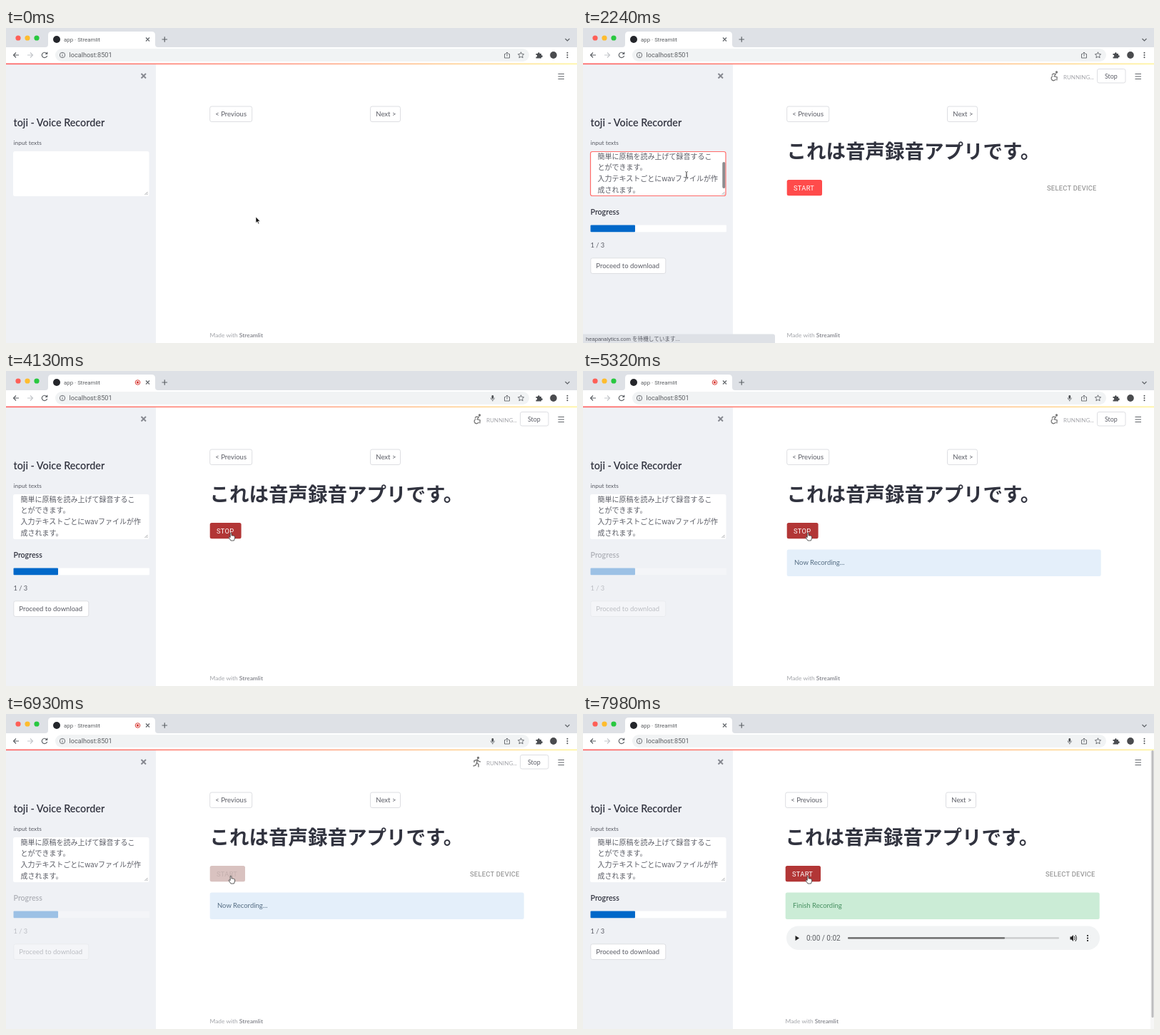
An HTML page that plays this animation: 800x442 px, repeating every 8000 ms.

```html
<!DOCTYPE html>
<html lang="ja">
<head>
<meta charset="utf-8">
<title>Voice Recorder</title>
<style>
html, body { margin: 0; width: 100%; height: 100%; overflow: hidden; background: #fff }
svg { display: block; width: 800px; height: 442px }
text { font: 9.5px Lato, sans-serif; fill: #5a5c65; white-space: pre }
.chrome { font: 7.9px Roboto, sans-serif; fill: #5c5f63 }
.bold { font-weight: 600; fill: #31333f }
.small { font-size: 8.4px }
.mui { font: 9.35px Roboto, sans-serif; letter-spacing: .0285em }
.jp { font: 10px "Noto Sans CJK JP", "Noto Sans CJK", sans-serif }
.title { font: 700 27.5px "Noto Sans CJK JP", "Noto Sans CJK", sans-serif; fill: #31333f }
.button { fill: #fff; stroke: #dddee2 }
.line { fill: none; stroke: #5f6368; stroke-width: 1.2 }
.dark { fill: #4b4e52 }
</style>
</head>
<body>
<svg viewBox="0 0 800 442">
  <defs>
    <linearGradient id="rainbow">
      <stop stop-color="#ff6464"/><stop offset=".5" stop-color="#ffa08a"/><stop offset="1" stop-color="#fff5a0"/>
    </linearGradient>
    <clipPath id="area"><rect x="10" y="174" width="190" height="61"/></clipPath>
  </defs>

  <!-- browser window -->
  <rect width="800" height="27" fill="#dee1e6"/>
  <circle cx="17" cy="14" r="3.600" fill="#fe5f57"/>
  <circle cx="30" cy="14" r="3.600" fill="#febc2e"/>
  <circle cx="43" cy="14" r="3.600" fill="#28c840"/>
  <path d="M55 27q4 0 4-4V10q0-5 5-5H204q5 0 5 5V23q0 4 4 4Z" fill="#fff"/>
  <circle cx="71" cy="16" r="5" fill="#24262b"/>
  <text class="chrome" x="81" y="18.8">app · Streamlit</text>
  <path class="line" d="M196 13.5l5 5m0-5l-5 5M218.500 16h7.500m-3.750-3.750v7.500M783.500 15l3 3 3-3"/>
  <g data-on="3640-7560" fill="none" stroke="#d93c36"><circle cx="184.500" cy="16" r="3.300"/><circle cx="184.500" cy="16" r="1.700" fill="#d93c36" stroke="none"/></g>
  <rect x="69" y="29" width="664" height="18" rx="9" fill="#f1f3f4"/>
  <path class="line" d="M18 38H10.500m3.500-3.500L10.500 38l3.500 3.500M57 35.800a3.700 3.700 0 1 0 .6 3M57.700 33.800v2.600h-2.600"/>
  <path class="line" d="M30 38h7.500m-3.500-3.500l3.500 3.500-3.500 3.500" style="stroke:#c4c7cb"/>
  <circle class="line" cx="79" cy="38" r="3.700" style="stroke-width:.9"/>
  <path class="line" d="M79 37.500v2.500m0-4.300v.9" style="stroke-width:.9"/>
  <text class="chrome" x="88.500" y="41" style="font-size:9.150px">localhost:8501</text>
  <g data-on="3640-8000"><rect class="dark" x="680.500" y="34" width="2.600" height="5" rx="1.300"/><path class="line" d="M679.200 37.500q0 3 2.600 3t2.600-3m-2.600 3v2" style="stroke-width:.8"/></g>
  <path class="line" d="M700 36.500h-1.500v5.500h7v-5.500H704M702 39.500v-5.500m-1.800 1.800l1.800-1.800 1.800 1.800" style="stroke-width:.9"/>
  <path class="line" d="M721.500 33.800l1.200 2.700 3 .3-2.200 2 .6 3-2.600-1.500-2.600 1.500.6-3-2.200-2 3-.3Z" style="stroke-width:.9"/>
  <path class="dark" d="M742.500 36h2.500a1.400 1.400 0 1 1 2.700 0h2.300v2.300a1.400 1.400 0 1 1 0 2.700v1.500h-7.500v-2.100a1.300 1.300 0 1 0 0-2.500Z"/>
  <ellipse cx="767" cy="38" rx="4.800" ry="5" fill="#4a4b4e"/>
  <g class="dark"><circle cx="786.500" cy="34.700" r="1"/><circle cx="786.500" cy="38" r="1"/><circle cx="786.500" cy="41.300" r="1"/></g>

  <!-- sidebar -->
  <rect y="51" width="210" height="391" fill="#eff1f5"/>
  <rect y="49.500" width="800" height="1.700" fill="url(#rainbow)"/>
  <path class="line" d="M189.500 64l6.500 6.500m0-6.500l-6.500 6.500" style="stroke:#85878f;stroke-width:1.900"/>
  <text class="bold" x="10.500" y="138" style="font-size:14.300px">toji - Voice Recorder</text>
  <text class="small" x="10.500" y="163.800">input texts</text>
  <rect x="10" y="173" width="190.500" height="63" rx="2.500" fill="#fff"/>
  <rect data-on="1120-3220" x="10.500" y="173.500" width="189.500" height="62" rx="2.500" fill="none" stroke="#ff6b69" stroke-width="1.200"/>
  <path class="line" d="M194.500 234l4-4m-1.500 4l1.500-1.500" style="stroke-width:.6"/>
  <path data-on="1120-1540" d="M20.800 182v12" stroke="#555" stroke-width=".8"/>
  <g data-on="1540-8000" clip-path="url(#area)">
    <text class="jp" x="20.500" y="183.700">簡単に原稿を読み上げて録音するこ</text>
    <text class="jp" x="20.500" y="199.400">とができます。</text>
    <text class="jp" x="20.500" y="215.100">入力テキストごとにwavファイルが作</text>
    <text class="jp" x="20.500" y="230.800">成されます。</text>
  </g>
  <rect data-on="1540-2590" x="195.300" y="188" width="4" height="37" rx="2" fill="#8c8c8f"/>
  <g id="progress" data-on="1890-8000">
    <text class="bold" x="10.500" y="262" style="font-size:10.600px">Progress</text>
    <rect x="10.500" y="276.500" width="190.500" height="9.700" rx="1" fill="#fff"/>
    <rect x="10.500" y="276.500" width="62.500" height="9.700" rx="1" fill="#0068c9"/>
    <text x="10.500" y="307.500" style="font-size:9.300px">1 / 3</text>
    <rect class="button" x="10.800" y="322.800" width="105" height="21.700" rx="2.500"/>
    <text x="18.300" y="337">Proceed to download</text>
  </g>

  <!-- main column -->
  <path class="line" d="M773.500 64.500h8.500m-8.500 3.500h8.500m-8.500 3.500h8.500"/>
  <g data-on="1890-2590 3360-7490">
    <g id="chair" class="line" style="stroke:#777;stroke-width:1.300">
      <circle cx="663.500" cy="62" r="1" fill="#777"/>
      <path d="M657 66.500l1.500-2.300 3.700.3-2 3.300 4 1.200-.4 4.500M658.300 67.500a3.200 3.200 0 1 0 4 4.200"/>
    </g>
    <g id="runner" class="line" style="stroke:#777;stroke-width:1.400">
      <circle cx="661.500" cy="61.500" r="1" fill="#777"/>
      <path d="M660.500 64l-1 4.500 2.500 2v4M659.500 68.500l-1.500 3.500-3.500 1M656 68v-2.500l4.500-1.500 2 2.500 2.500.7"/>
    </g>
    <text x="673" y="71.800" style="font-size:8px;fill:#a5a6ab">RUNNING...</text>
    <rect class="button" x="720.500" y="57.500" width="39.500" height="19.500" rx="2.500"/>
    <text x="731" y="70.700" style="font-size:8.900px">Stop</text>
  </g>
  <g id="main">
    <rect class="button" x="285.700" y="110" width="59" height="21.500" rx="2.500"/>
    <text x="293.300" y="124.200">&lt; Previous</text>
    <rect class="button" x="510.500" y="110" width="42" height="21.500" rx="2.500"/>
    <text x="518.300" y="124.200">Next &gt;</text>
    <text class="small" x="285.500" y="433.500" style="fill:#a3a5aa">Made with <tspan font-weight="600" fill="#808289">Streamlit</tspan></text>
    <g data-on="1890-8000">
      <text class="title" x="285.500" y="183">これは音声録音アプリです。</text>
      <rect id="button" x="285.700" y="213" height="22.300" rx="2.500"/>
      <text id="label" class="mui" x="295" y="227.600"></text>
      <text data-on="1890-3500 6720-8000" class="mui" x="650" y="227.600" style="fill:#808080">SELECT DEVICE</text>
    </g>
    <g data-on="4550-7490">
      <rect x="285.700" y="250.500" width="440" height="37.500" rx="2.500" fill="#e4effa"/>
      <text x="296" y="272.300" style="fill:#566e84">Now Recording...</text>
    </g>
    <g data-on="7490-8000">
      <rect x="285.700" y="250.500" width="440" height="37.500" rx="2.500" fill="#cbecd6"/>
      <text x="296" y="272.300" style="fill:#479061">Finish Recording</text>
    </g>
    <g data-on="7560-8000">
      <rect x="287" y="297.500" width="439" height="33.500" rx="16.700" fill="#f1f3f4"/>
      <path d="M299.500 311l5.500 3.500-5.500 3.500Z" fill="#222"/>
      <text class="chrome" x="315" y="318" style="font-size:10px">0:00 / 0:02</text>
      <rect x="373" y="313.300" width="296" height="2.300" rx="1" fill="#c9cacb"/>
      <rect x="373" y="313.300" width="220" height="2.300" rx="1" fill="#686969"/>
      <path d="M684.500 312.500h2l2.500-2.500v9l-2.500-2.500h-2Z" fill="#222"/>
      <path d="M690.500 312q1.500 2.500 0 5m1.300-7q3.200 4.500 0 9" fill="none" stroke="#222"/>
      <circle cx="709" cy="311" r="1"/><circle cx="709" cy="314.500" r="1"/><circle cx="709" cy="318" r="1"/>
    </g>
  </g>
  <g data-on="7560-8000"><rect x="795" y="51" width="5" height="391" fill="#f6f6f6"/><rect x="796.500" y="51" width="3" height="375" rx="1.500" fill="#bcbcbe"/></g>
  <g data-on="1960-2590">
    <path d="M0 429.500H266q3 0 3 3V442H0Z" fill="#dee1e6"/>
    <text class="jp" x="4" y="438.600" style="font-size:7.600px;font-family:'Liberation Sans','Noto Sans CJK JP',sans-serif">heapanalytics.com を待機しています...</text>
  </g>

  <!-- pointer -->
  <circle id="ring" r="15.500" fill="none" stroke="#86b5ec" stroke-width="2"/>
  <g id="pointer">
    <path id="arrow" d="M0-2v8.500l2-1.800 1.500 3.300 1.300-.6-1.500-3.200h2.700Z" fill="#111" stroke="#fff" stroke-width=".6"/>
    <path id="beam" d="M-2-4.500q2 0 2 1.500V3q0 1.500-2 1.500M2-4.500q-2 0-2 1.500V3q0 1.500 2 1.500M-1 1h2" fill="none" stroke="#666" stroke-width=".9"/>
    <path id="hand" d="M-1.800-4.500q1.300-1.200 1.800.5V-1q1-.8 1.700.2 1-.6 1.600.4 1.200-.3 1.300 1V3L3.300 6H-1L-4 1.500q0-1.500 2.200 0Z" fill="#fff" stroke="#333" stroke-width=".8"/>
  </g>
</svg>
<script>
const LOOP = 8000;
const $ = id => document.getElementById(id);
const show = (el, on) => { el.style.display = on ? '' : 'none'; };
const ramp = (t, from, to) => Math.min(1, Math.max(0, (t - from) / (to - from)));
const ease = p => p * p * (3 - 2 * p);

const timed = [...document.querySelectorAll('[data-on]')].map(el => ({
  el, spans: el.dataset.on.split(' ').map(span => span.split('-').map(Number))
}));
const clicks = [1120, 3220, 6440];

function drawButton(t) {
  const stop = t >= 3500 && t < 6720, disabled = t >= 6720 && t < 7420;
  $('label').textContent = stop ? 'STOP' : 'START';
  $('label').style.fill = disabled ? '#c4afad' : '#fff';
  $('button').setAttribute('width', stop ? 43.9 : 49.3);
  $('button').setAttribute('fill', disabled ? '#d9c2c0' : t < 3010 ? '#ff4b4b' : '#b23636');
}

function drawPointer(t) {
  const toText = ease(ramp(t, 770, 910)), toButton = ease(ramp(t, 2730, 3080));
  const x = 350 - 205 * toText + 171 * toButton;
  const y = 267 - 61 * toText + 26 * toButton;
  $('pointer').setAttribute('transform', `translate(${x} ${y})`);
  show($('arrow'), t < 910 || (t >= 2800 && t < 3010));
  show($('beam'), t >= 910 && t < 2800);
  show($('hand'), t >= 3010);

  const click = clicks.find(c => t >= c && t < c + 350);
  show($('ring'), click);
  if (click) {
    const age = t - click;
    $('ring').setAttribute('transform', `translate(${x} ${y}) scale(${0.6 + 0.4 * ramp(age, 0, 140)})`);
    $('ring').style.opacity = 1 - ramp(age, 230, 350);
  }
}

function draw(now) {
  const t = now % LOOP;
  for (const { el, spans } of timed) show(el, spans.some(([from, to]) => t >= from && t < to));
  const running = t % 500 >= 350;
  show($('runner'), running);
  show($('chair'), !running);
  $('progress').style.opacity = t < 7490 ? 1 - 0.66 * ramp(t, 4830, 5180) : 1;
  $('main').setAttribute('transform', t >= 7560 ? 'translate(-2 0)' : '');
  drawButton(t);
  drawPointer(t);
  requestAnimationFrame(() => draw(performance.now()));
}
draw(0);
</script>
</body>
</html>
```
